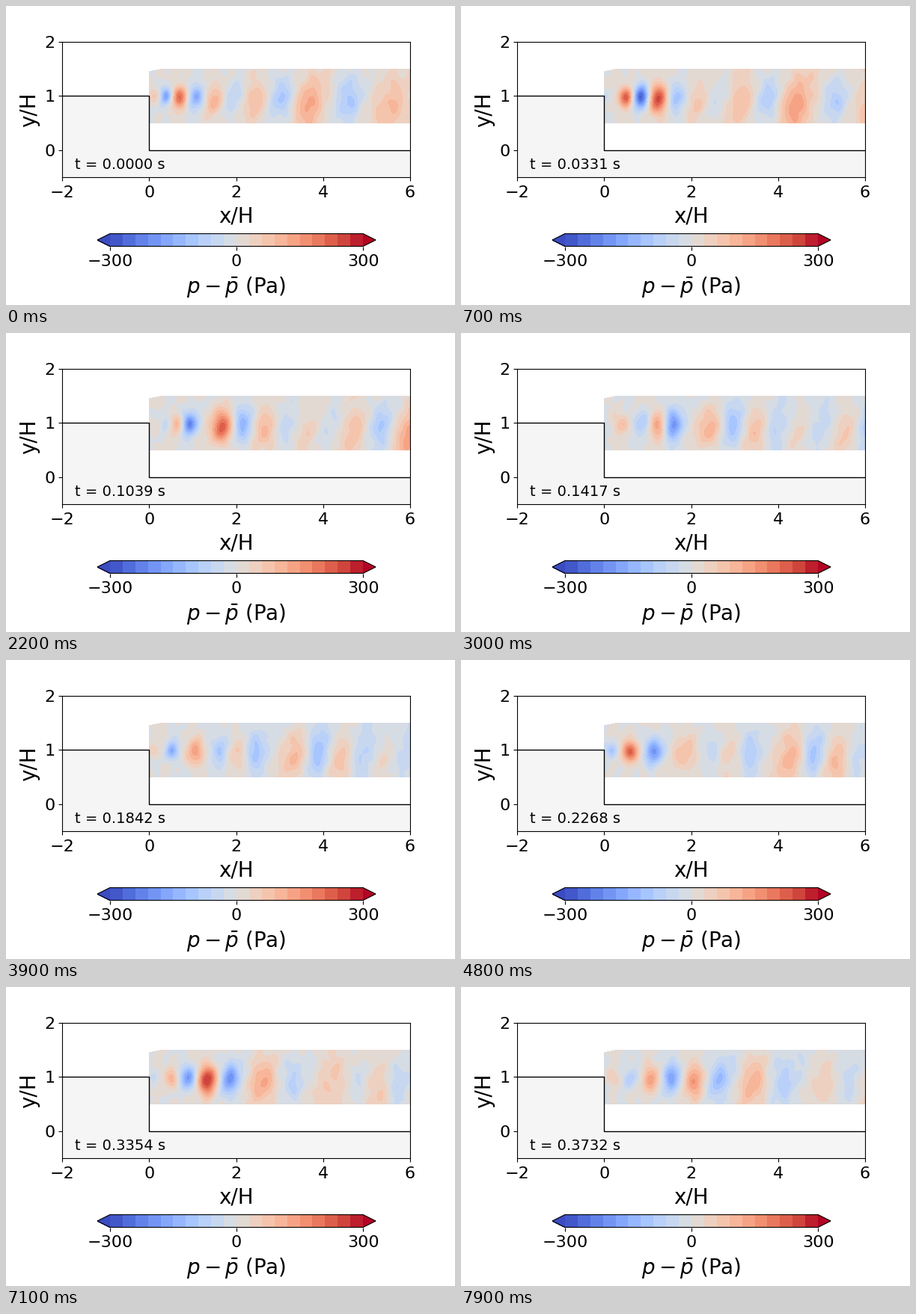
A matplotlib script for the animation above (8000 ms loop, 600 by 400 pixels).

```python
import numpy as np
import matplotlib.pyplot as plt
from matplotlib.animation import FuncAnimation

FRAMES, INTERVAL = 80, 100
DT = 0.004724                     # seconds of flow per frame
LEVELS = np.linspace(-300, 300, 21)

plt.rcParams.update({"font.family": "DejaVu Sans", "font.size": 16,
                     "axes.labelsize": 20, "xtick.major.pad": 4.2})

# Measured strip, with a small bevel at its upper left corner
xs, s = np.meshgrid(np.linspace(0, 6, 181), np.linspace(0, 1, 51))
ys = 0.5 + s * (np.minimum(1.5, 1.45 + xs / 6) - 0.5)

# Vortices of alternating sign leave the step; the shedding rate drifts slowly
order = np.arange(24)
births = np.interp(order, [0, 2, 4, 10, 11, 13, 17, 20, 23],
                   [-63, -45, -33, -3, 6, 14, 44, 61, 81])
signs = np.where(order % 2 == 0, 1, -1)
vigour = 0.75 + 0.35 * np.cos(2 * np.pi * (order - 2) / 7.5)

# All share one path: travel time in frames to each station downstream
stations = np.linspace(0, 8, 401)
speed = 0.045 + 0.06 * np.tanh(stations / 1.7)
travel = np.cumsum(np.gradient(stations) / speed)

# Fine ripples that drift with the flow
rng = np.random.default_rng(7)
ripples = np.column_stack([rng.uniform(3, 20, 18), rng.uniform(-16, 16, 18),
                           rng.uniform(0, 2 * np.pi, 18)])


def vortex(x, sign, vigour):
    """Grows to full strength past the step, then spreads and weakens."""
    peak = 110 + 185 * np.exp(-((x - 1.1) / 0.8) ** 2)
    strength = sign * vigour * peak * np.tanh(x / 0.25)
    width = min(0.12 + 0.08 * x, 0.34)
    height = min(0.13 + 0.1 * x, 0.5)
    y = 1 - (0.04 if sign > 0 else 0.015) * x
    dy = ys - y
    dx = xs - x - min(0.06 * x, 0.2) * dy
    return strength * np.exp(-(dx / width) ** 2 - (dy / height) ** 2)


def pressure(frame):
    swing = 10 + 25 * np.cos(2 * np.pi * (frame - 10) / 52)
    field = swing * xs / 6
    for kx, ky, phase in ripples:
        field = field + 2.8 * np.sin(kx * (xs - 0.1 * frame) + ky * ys + phase)
    for birth, sign, power in zip(births, signs, vigour):
        if frame > birth:
            x = np.interp(frame - birth, travel, stations)
            field = field + vortex(x, sign, power)
    return field


def draw_field(frame):
    return ax.contourf(xs, ys, pressure(frame), LEVELS, cmap="coolwarm",
                       extend="both")


fig = plt.figure(figsize=(6, 4), dpi=100)
ax = fig.add_axes([0.125, 0.4275, 0.775, 0.4525])
step_x, step_y = [-2, 0, 0, 6], [1, 1, 0, 0]
ax.fill_between(step_x, step_y, -0.5, color="whitesmoke", lw=0)
ax.plot(step_x, step_y, "k", lw=1)
ax.set(xlim=(-2, 6), ylim=(-0.5, 2), xticks=range(-2, 7, 2), yticks=range(3))
ax.set_xlabel("x/H", labelpad=5.5)
ax.set_ylabel("y/H")
clock = ax.text(-1.7, -0.35, "", fontsize=14)

contours = draw_field(0)
cax = fig.add_axes([122 / 600, 78.5 / 400, 372 / 600, 16.9 / 400])
bar = fig.colorbar(contours, cax=cax, orientation="horizontal",
                   ticks=[-300, 0, 300])
bar.set_label(r"$p-\bar{p}$ (Pa)", labelpad=5.5)


def update(frame):
    global contours
    contours.remove()
    contours = draw_field(frame)
    clock.set_text(f"t = {frame * DT:.4f} s")
    return contours, clock


anim = FuncAnimation(fig, update, frames=FRAMES, interval=INTERVAL,
                     init_func=lambda: (), repeat=True, repeat_delay=0)
plt.show()
```
